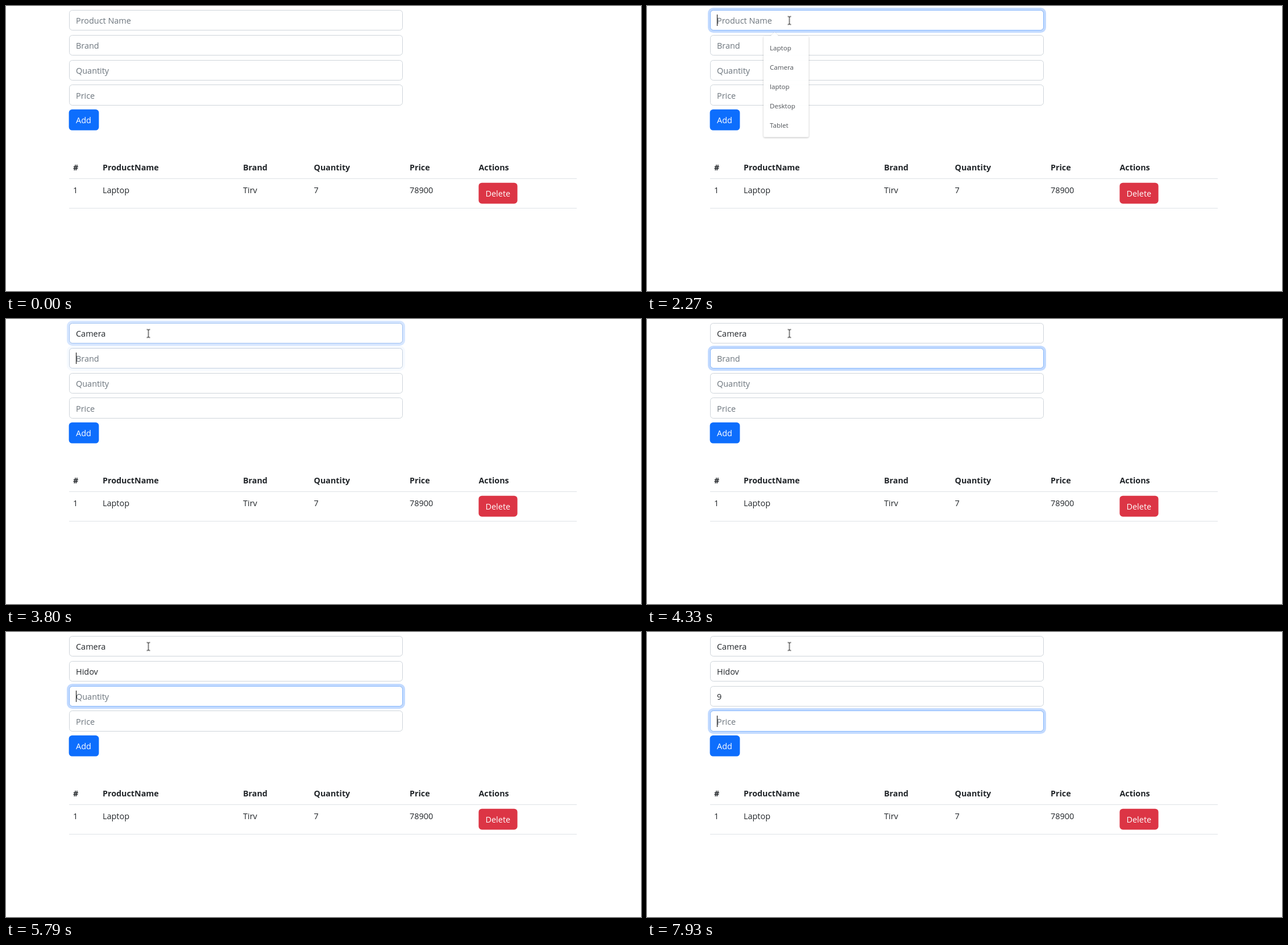
These frames come from a looping animation (1117 by 501 pixels, 8 s). An HTML page:

```html
<!DOCTYPE html>
<html lang="en">
<head>
<meta charset="utf-8">
<title>Product form</title>
<style>
  html, body { margin: 0; width: 100%; height: 100%; overflow: hidden; background: #fff; }
  svg { display: block; width: 1117px; height: 501px; }
  text { font: 14.45px "Open Sans", "Noto Sans", sans-serif; fill: #212529; white-space: pre; }
  .head text { font-size: 14.3px; font-weight: 700; }
  .hint { fill: #6c757d; }
  .btn { fill: #fff; }
  .box { fill: #fff; stroke: #ced4da; }
  .ring { fill: none; opacity: 0; }
  .glow { stroke: rgba(13, 110, 253, .25); stroke-width: 4; }
  .edge { stroke: #86b7fe; }
  .popup { opacity: 0; filter: drop-shadow(0 1px 1.5px rgba(0, 0, 0, .28)); }
  .popup path { fill: #fff; }
  .popup text { font-size: 11.6px; fill: #484c51; }
  .typed tspan { fill-opacity: 0; }
  #caret, #arrow, #beam { opacity: 0; }
</style>
</head>
<body>
<svg id="stage" viewBox="0 0 1117 501">
  <g id="fields"></g>
  <rect x="110.6" y="181.8" width="52.8" height="36.8" rx="5.7" fill="#0d6efd"/>
  <text class="btn" x="123" y="206">Add</text>

  <g class="head" id="head"></g>
  <rect x="111" y="303" width="893" height="1" fill="#dee2e6"/>
  <g id="row"></g>
  <rect x="831.4" y="310.7" width="68.2" height="36.8" rx="5.7" fill="#dc3545"/>
  <text class="btn" x="843.5" y="335">Delete</text>
  <rect x="111" y="355" width="893" height="1" fill="#dee2e6"/>

  <rect id="caret" x="123" y="15" width="1" height="20"/>
  <g id="popups"></g>
  <path id="arrow" d="M.5 .5V15.5L4 12.2L6.4 17.8L8.8 16.8L6.4 11.3H11Z" fill="#fff" stroke="#000"/>
  <path id="beam" d="M-3 -7H-1L0 -6L1 -7H3M0 -6V6M-3 7H-1L0 6L1 7H3" fill="none" stroke="#000"/>
</svg>
<script>
const LOOP = 8000;
const $ = id => document.getElementById(id);

function add(parent, tag, attrs, text = '') {
  const el = document.createElementNS('http://www.w3.org/2000/svg', tag);
  for (const key in attrs) el.setAttribute(key, attrs[key]);
  el.textContent = text;
  return parent.appendChild(el);
}

// Holds each value until the next time: [[ms, value], ...]
function hold(el, prop, first, list) {
  const keys = [[0, first], ...list, [LOOP, list[list.length - 1][1]]];
  el.animate(
    keys.map(([ms, value]) => ({ offset: ms / LOOP, [prop]: value, easing: 'step-end' })),
    { duration: LOOP, iterations: Infinity }
  );
}

const fields = [
  { hint: 'Product Name', value: 'Camera', keys: [2330, 2870, 3210, 3300, 3400, 3540],
    ring: [[1860, .1], [1930, .6], [2000, 1], [3800, .68], [3860, .2], [3930, 0]] },
  { hint: 'Brand', value: 'Hidov', keys: [4860, 4990, 5190, 5390, 5460],
    ring: [[3800, .15], [3860, .75], [3930, 1], [5660, .68], [5720, .2], [5790, 0]] },
  { hint: 'Quantity', value: '9', keys: [6670],
    ring: [[5660, .15], [5720, .75], [5790, 1], [6860, .68], [6930, .2], [7000, 0]] },
  { hint: 'Price', value: '', keys: [],
    ring: [[6860, .15], [6930, .75], [7000, 1]] }
];

fields.forEach((field, i) => {
  const g = add($('fields'), 'g', {});
  // Edges snap to whole pixels
  const top = Math.round(7 + 43.83 * i);
  const height = Math.round(43.2 + 43.83 * i) - top;
  const box = { x: 111.5, y: top + .5, width: 586, height: height - 1, rx: 5.2 };
  add(g, 'rect', { class: 'box', ...box });
  const ring = add(g, 'g', { class: 'ring' });
  add(ring, 'rect', { class: 'glow', x: 109, y: top - 2, width: 591, height: height + 4, rx: 7.6 });
  add(ring, 'rect', { class: 'edge', ...box });
  hold(ring, 'opacity', 0, field.ring);

  const spot = { x: 123, y: 31 + 44 * i };
  const hint = add(g, 'text', { class: 'hint', ...spot }, field.hint);
  field.text = add(g, 'text', { class: 'typed', ...spot });
  field.keys.forEach((ms, n) => {
    hold(add(field.text, 'tspan', {}, field.value[n]), 'fillOpacity', 0, [[ms, 1]]);
  });
  if (field.keys.length) hold(hint, 'opacity', 1, [[field.keys[0], 0]]);
});

const columns = [118, 170, 417, 541.5, 710, 831.5];
['#', 'ProductName', 'Brand', 'Quantity', 'Price', 'Actions'].forEach((name, i) =>
  add($('head'), 'text', { x: columns[i], y: 289 }, name));
['1', 'Laptop', 'Tirv', '7', '78900'].forEach((cell, i) =>
  add($('row'), 'text', { x: columns[i], y: 329 }, cell));

// Suggestion list with a small pointer on its top edge
function popup(dy, width, items, fade) {
  const g = add($('popups'), 'g', { class: 'popup', transform: `translate(205 ${46 + dy})` });
  const bottom = 7 + 7 + 34.1 * items.length;
  add(g, 'path', { d: `M2 7H12L19.5 0L27 7H${width - 2}q2 0 2 2V${bottom - 2}q0 2 -2 2H2q-2 0 -2 -2V9q0 -2 2 -2Z` });
  items.forEach((item, i) => add(g, 'text', { x: 11, y: 32 + 34.1 * i }, item));
  hold(g, 'opacity', 0, fade);
}
popup(0, 79.5, ['Laptop', 'Camera', 'laptop', 'Desktop', 'Tablet'],
  [[2000, .5], [2070, 1], [2270, .96], [2330, 0]]);
popup(0, 77, ['Camera'], [[2390, .6], [2460, 1], [2940, .5], [3070, 0]]);
popup(44, 68, [fields[1].value], [[4990, 1], [5520, .5], [5590, 0]]);

// Caret stops: time, field, letters before it
const stops = [[1860, 0, 0], [3800, 1, 0], [5660, 2, 0], [6860, 3, 0]];
fields.forEach((field, i) => field.keys.forEach((ms, n) => stops.push([ms, i, n + 1])));
stops.sort((a, b) => a[0] - b[0]);
hold($('caret'), 'transform', 'translate(0px, 0px)', stops.map(([ms, i, n]) => {
  const x = n ? Math.round(fields[i].text.getSubStringLength(0, n)) : 0;
  return [ms, `translate(${x}px, ${44 * i}px)`];
}));

// The caret blinks every 530 ms, starting anew at each stop
const blink = [];
stops.forEach(([ms], k) => {
  const end = k + 1 < stops.length ? stops[k + 1][0] : LOOP;
  for (let t = ms, on = 1; t < end; t += 530, on = 1 - on) blink.push([t, on]);
});
hold($('caret'), 'opacity', 0, blink);

const at = (ms, x, y) => [ms, `translate(${x}px, ${y}px)`];
hold($('arrow'), 'transform', 'translate(996px, 429px)',
  [at(920, 742, 246), at(990, 322, -4), at(1200, 263, -5)]);
hold($('arrow'), 'opacity', 0, [[850, 1], [1060, 0], [1200, 1], [1330, 0]]);
hold($('beam'), 'transform', 'translate(255.5px, 13.5px)',
  [at(1400, 251.5, 22.5), at(1460, 250.5, 25.5)]);
hold($('beam'), 'opacity', 0, [[1330, 1]]);
</script>
</body>
</html>
```
